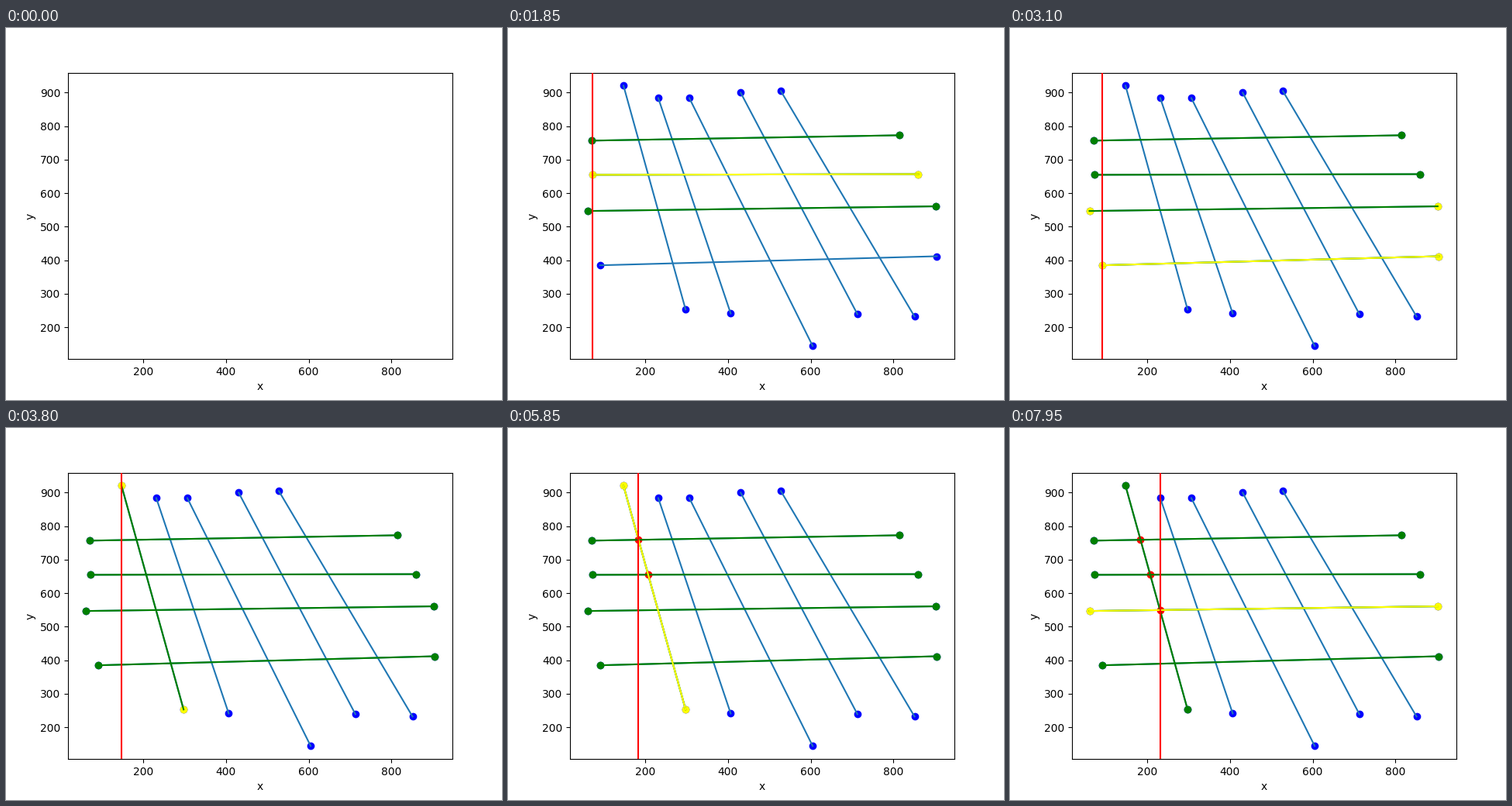
Write a matplotlib script that moves like this. It is 640 px wide and 480 px high and loops after 8 s.

```python
import matplotlib.pyplot as plt
from matplotlib.animation import FuncAnimation

FRAMES, STEP_MS = 160, 50

# (left end, right end) of every segment
SEGS = [
    ((61, 547), (902, 561)),
    ((71, 757), (815, 773)),
    ((73, 655), (860, 657)),
    ((91, 385), (905, 412)),
    ((148, 921), (298, 253)),
    ((232, 884), (407, 241)),
    ((307, 884), (605, 144)),
    ((431, 900), (713, 239)),
    ((528, 905), (851, 232)),
]
MID, TOP, UPPER, LOW, STEEP = range(5)


def crossing(i, j):
    (x1, y1), (x2, y2) = SEGS[i]
    (x3, y3), (x4, y4) = SEGS[j]
    m, n = (y2 - y1) / (x2 - x1), (y4 - y3) / (x4 - x3)
    x = (y3 - y1 + m * x1 - n * x3) / (m - n)
    return x, y1 + m * (x - x1)


class Story:
    """Runs the sweep and records one snapshot per step."""

    def __init__(self):
        self.shown, self.sweep_x = 0, None
        self.active, self.lit_line, self.lit_ends = set(), set(), set()
        self.hits, self.states = [], []
        self.snap()

    def snap(self):
        self.states.append((self.shown, self.sweep_x, set(self.active),
                            set(self.lit_line), set(self.lit_ends),
                            list(self.hits)))

    def show_next(self):
        self.shown += 1
        self.snap()

    def sweep(self, x):
        self.sweep_x = x
        self.snap()

    def insert(self, i):
        self.active.add(i)
        self.snap()

    def line(self, i, on):
        (self.lit_line.add if on else self.lit_line.discard)(i)
        self.snap()

    def ends(self, i, on):
        (self.lit_ends.add if on else self.lit_ends.discard)(i)
        self.snap()

    def probe(self, i):
        self.line(i, True)
        self.line(i, False)

    def compare(self, a, b, rounds=2, blink=True, hit=None):
        self.ends(a, True)
        self.line(a, True)
        for k in range(rounds):
            self.ends(b, True)
            if hit and hit not in self.hits:
                self.hits.append(hit)
            self.line(b, True)
            self.line(b, False)
            self.ends(b, False)
            if k < rounds - 1 and blink:
                self.probe_off(a)
        self.line(a, False)
        self.ends(a, False)

    def probe_off(self, i):
        self.line(i, False)
        self.line(i, True)

    def start(self, i):
        self.sweep(SEGS[i][0][0])
        self.insert(i)


def run():
    s = Story()
    for _ in SEGS:
        s.show_next()
    s.start(MID)
    s.start(TOP)
    s.compare(TOP, MID)
    s.start(UPPER)
    s.compare(UPPER, TOP)
    s.compare(UPPER, MID)
    s.start(LOW)
    s.compare(LOW, MID, rounds=1)
    s.snap()

    s.sweep(SEGS[STEEP][0][0])
    s.probe(MID)
    s.probe(TOP)
    s.insert(STEEP)
    s.snap()
    s.compare(STEEP, TOP, hit=crossing(STEEP, TOP))

    s.sweep(crossing(STEEP, TOP)[0])
    s.compare(TOP, STEEP, blink=False)
    s.snap()
    s.compare(STEEP, UPPER, rounds=3, hit=crossing(STEEP, UPPER))

    s.sweep(crossing(STEEP, UPPER)[0])
    s.compare(UPPER, STEEP, blink=False)
    s.compare(STEEP, MID, rounds=3, hit=crossing(STEEP, MID))

    s.sweep(crossing(STEEP, MID)[0])
    s.compare(MID, STEEP, blink=False)
    return s.states[:FRAMES]


STATES = run()

fig, ax = plt.subplots(figsize=(6.4, 4.8), dpi=100)
ax.set_xlabel("x")
ax.set_ylabel("y")


def padded(values):
    lo, hi = min(values), max(values)
    pad = 0.05 * (hi - lo)
    return lo - pad, hi + pad


ax.set_xlim(*padded([p[0] for s in SEGS for p in s]))
ax.set_ylim(*padded([p[1] for s in SEGS for p in s]))

dots, base, ends, green, yellow = [], [], [], [], []
for seg in SEGS:
    xs, ys = zip(*seg)
    dots.append(ax.scatter(xs, ys, color="blue", zorder=1))
    base.append(ax.plot(xs, ys, color="C0", zorder=2)[0])
    ends.append(ax.plot(xs, ys, "o", color="green", zorder=2.5)[0])
    green.append(ax.plot(xs, ys, color="green", zorder=3)[0])
    yellow.append(ax.plot(xs, ys, color="yellow", zorder=4)[0])
hit_dots = ax.plot([], [], "o", color="red", zorder=2.6)[0]
sweep_line = ax.axvline(SEGS[0][0][0], color="red", zorder=5)


def draw(frame):
    shown, x, active, lit_line, lit_ends, hits = STATES[frame]
    for i in range(len(SEGS)):
        dots[i].set_visible(i < shown)
        base[i].set_visible(i < shown)
        green[i].set_visible(i in active)
        yellow[i].set_visible(i in lit_line)
        ends[i].set_visible(i in active or i in lit_ends)
        ends[i].set_color("yellow" if i in lit_ends else "green")
    hit_dots.set_data([h[0] for h in hits], [h[1] for h in hits])
    sweep_line.set_visible(x is not None)
    if x is not None:
        sweep_line.set_xdata([x, x])
    return []


anim = FuncAnimation(fig, draw, frames=FRAMES, interval=STEP_MS,
                     init_func=lambda: draw(0), repeat=True, repeat_delay=0)
plt.show()
```
